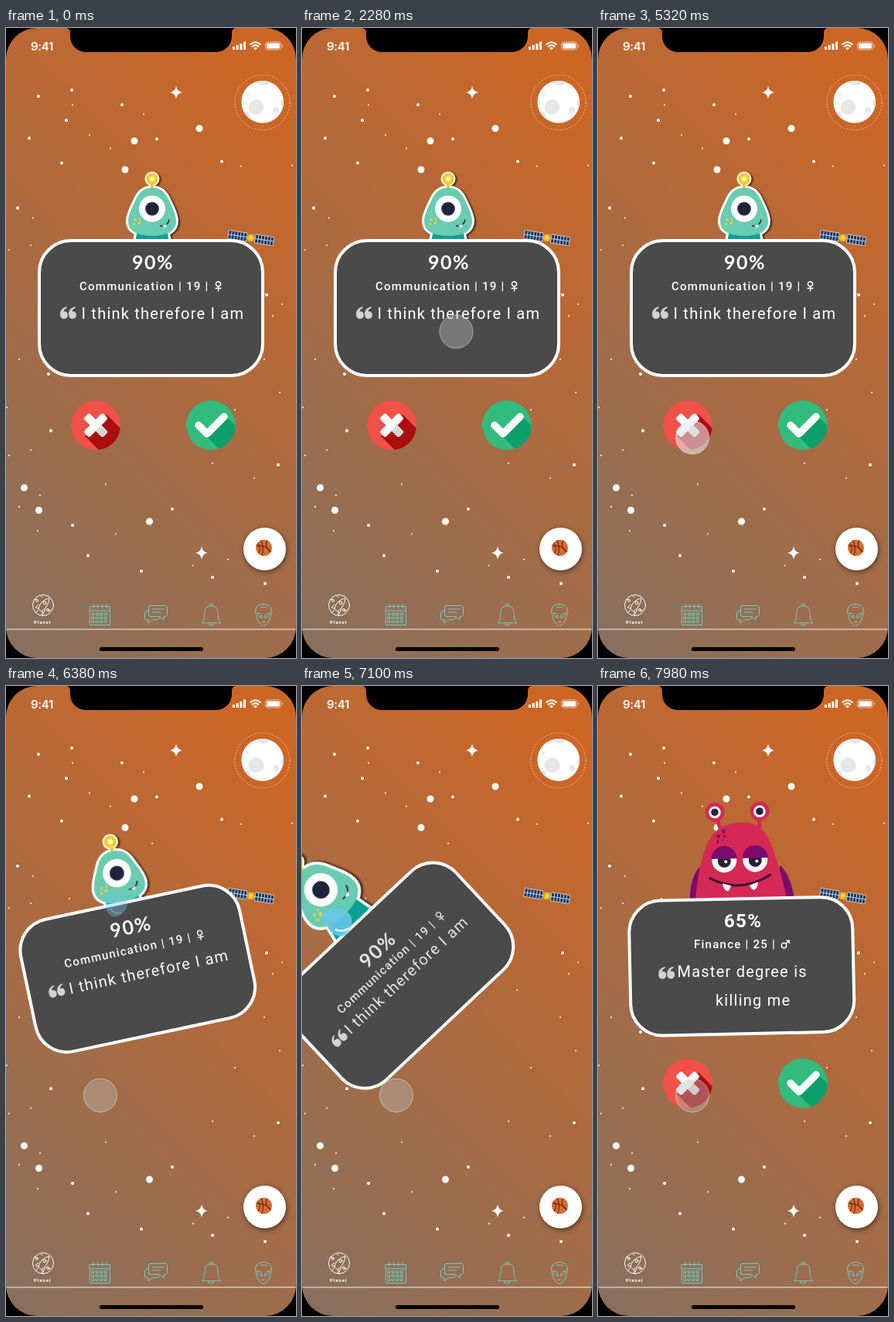
Write an HTML page that moves like this. It is 375x812 px and loops after 8 s.

```html
<!DOCTYPE html>
<html lang="en">
<head>
<meta charset="utf-8">
<title>Alien match</title>
<style>
html, body { margin: 0; width: 100%; height: 100%; overflow: hidden; background: #000; }
#screen { position: relative; width: 375px; height: 812px; overflow: hidden; border-radius: 40px;
  background: linear-gradient(225deg, #cd6625 8%, #86705f); }
svg { display: block; }
text { font-family: Roboto, sans-serif; fill: #fff; white-space: pre; }
.pct { font-weight: 700; font-size: 24px; letter-spacing: 1.3px; }
.info { font-weight: 500; font-size: 15px; letter-spacing: 1.25px; }
.say { font-size: 20px; letter-spacing: 1.23px; }
.line { fill: none; stroke: #fff; stroke-width: 1.4; }
.icons { fill: none; stroke: #74cfcb; stroke-width: .95; stroke-linejoin: round; stroke-linecap: round; }
.sticker { filter: drop-shadow(2px 1px 1px #000a); }
.outline { fill: #fff; stroke: #fff; stroke-width: 6; stroke-linejoin: round; }
</style>
</head>
<body>
<div id="screen">
<svg width="375" height="812" viewBox="0 0 375 812">
  <defs>
    <path id="spark" d="M0-8.500Q1-1 8 0Q1 1 0 8.500Q-1 1-8 0Q-1-1 0-8.500Z" fill="#fff"/>
    <g id="quote" fill="#d2d2d2">
      <path id="six" d="M0 9C0 4 3 0 8.500-.5L9 .7C6 1.800 4.500 3.500 4.500 5.500C8 4.600 9.900 7.200 9.900 9.800C9.900 13 7.700 15 5 15C2 15 0 12.700 0 9Z"/>
      <use href="#six" x="11"/>
    </g>
    <path id="head" d="M0-27C12-27 18-20 22-10C26-1 31 7 31 16C31 29 18 35 0 35C-18 35-31 29-31 16C-31 7-26-1-22-10C-18-20-12-27 0-27Z"/>
    <path id="neck" d="M-19 28H19L24 51H-24Z"/>
    <g id="panel">
      <rect x="-12" y="-5.500" width="24" height="11" fill="#173661" stroke="#e8eef5" stroke-width=".7"/>
      <path d="M-8-5V5M-4-5V5M0-5V5M4-5V5M8-5V5M-12 0H12" stroke="#cfdcea" stroke-width=".9"/>
    </g>
    <rect id="bar" x="-17.500" y="-5.200" width="35" height="10.400" rx="3" fill="#fff"/>
    <clipPath id="disc"><circle r="32"/></clipPath>
    <clipPath id="moonDisc"><circle cx="331.700" cy="95.300" r="27.300"/></clipPath>
  </defs>

  <g id="stars" stroke="#fff" stroke-linecap="round"></g>
  <use href="#spark" x="220" y="83"/>
  <use href="#spark" x="253" y="676.500"/>

  <g>
    <circle cx="331.500" cy="96" r="35.500" fill="none" stroke="#fff" stroke-opacity=".55" stroke-dasharray="2 2"/>
    <circle cx="331.700" cy="95.300" r="27.300" fill="#fff"/>
    <g fill="#e7e7e7" clip-path="url(#moonDisc)">
      <circle cx="323.500" cy="102" r="10"/><circle cx="349" cy="106" r="4"/><circle cx="311" cy="113" r="5"/>
      <circle cx="359" cy="97" r="4"/><ellipse cx="332" cy="70" rx="8" ry="4"/><circle cx="312" cy="86" r="2"/>
    </g>
  </g>

  <g id="satellite" transform="translate(316.700 270.500) rotate(9)">
    <path d="M-17 0H17" stroke="#ddd"/>
    <use href="#panel" x="-17.500"/><use href="#panel" x="17.500"/>
    <rect x="-4" y="-4.500" width="8" height="9" rx="2" fill="#f5b51c"/>
    <circle r="2" fill="#ffe27a"/>
  </g>

  <g id="buttons">
    <g transform="translate(116 512)" clip-path="url(#disc)">
      <circle r="32" fill="#f05149"/>
      <path d="M14-14L50 22V50H22L-14 14Z" fill="#aa0f10"/>
      <use href="#bar" transform="rotate(45)"/>
      <rect y="-5.200" width="17.500" height="10.400" rx="3" fill="#d6d6d6" transform="rotate(45)"/>
      <use href="#bar" transform="rotate(-45)"/>
    </g>
    <g transform="translate(265 512)" clip-path="url(#disc)">
      <circle r="32" fill="#32bb7c"/>
      <path d="M20-11L60 29V60H40L-6 14Z" fill="#0c9f6c"/>
      <path d="M-16 0L-5 11L17-11" fill="none" stroke="#fff" stroke-width="9.500" stroke-linecap="round" stroke-linejoin="round"/>
    </g>
  </g>

  <g id="alienA" class="sticker">
    <g class="outline">
      <use href="#neck"/><use href="#head"/>
      <circle cy="-38.500" r="6.500"/><path d="M0-38V-24"/>
    </g>
    <use href="#neck" fill="#08a092"/>
    <path d="M0-36V-22" stroke="#fcc51d" stroke-width="4"/>
    <circle cy="-38.500" r="7.500" fill="#fccb1f"/>
    <circle cy="-38.500" r="3.300" fill="#fff6d5"/>
    <use href="#head" fill="#69cbb0"/>
    <circle r="17" fill="#fff"/>
    <circle r="8.800" fill="#20243a"/>
    <g fill="#fbd02c"><circle cx="-22" cy="14" r="1.600"/><circle cx="-17" cy="18" r="2"/><circle cx="-23" cy="20" r="1.400"/><circle cx="-16" cy="13" r="1.200"/></g>
    <path d="M10 22Q20 23 22 14" fill="none" stroke="#263246" stroke-width="1.600"/>
    <path d="M13 22L19 19.500L17 24Z" fill="#fff"/>
  </g>

  <g id="alienB">
    <path d="M-52 8C-62 18-66 36-66 60H-40ZM52 8C62 18 69 36 70 60H40Z" fill="#7c0b6e"/>
    <path d="M-31-62L-22-34M27-62L26-36" stroke="#d42654" stroke-width="5"/>
    <path d="M-59 58C-56 20-48-12-38-28C-28-44-12-48 3-48C24-48 33-38 40-22C50 5 56 30 61 58Z" fill="#d62855"/>
    <g id="stalkEyes"></g>
    <g fill="#86105f"><circle cx="-20" cy="-37" r="2.500"/><circle cx="-27" cy="-31" r="2.300"/><circle cx="-19" cy="-31" r="1.700"/><circle cx="-28" cy="-24" r="2"/><circle cx="-22" cy="-26" r="1.200"/></g>
    <g id="faceEyes"></g>
    <path d="M-39 23Q0 44 39 20" fill="none" stroke="#3a1233" stroke-width="3" stroke-linecap="round"/>
    <path d="M-23 30L-12 33Q-14 40-17 40Q-22 38-23 30ZM12 33L23 29Q22 38 18 39Q14 39 12 33Z" fill="#fff"/>
  </g>

  <g id="card">
    <rect x="-144.500" y="-87" width="289" height="174" rx="41" fill="#4a4a4a" stroke="#fff" stroke-width="4"/>
    <use id="mark" href="#quote"/>
    <g id="textA" transform="translate(-187.500 -361)">
      <text data-drift="0 16" class="pct" x="163" y="311" style="font-family:Lato,sans-serif;font-size:25px;letter-spacing:1.5px">90%</text>
      <g data-drift="4 9">
        <text class="info" x="95" y="338">Communication | 19 |</text>
        <path class="line" d="M274.500 333V339.500M270.500 335.500H278.500"/><circle class="line" cx="274.500" cy="330" r="3"/>
      </g>
      <text data-drift="-8 -1" class="say" x="97.500" y="375">I think therefore I am</text>
    </g>
  </g>
  <g id="textB">
    <text class="pct" x="163" y="311">65%</text>
    <text class="info" x="124" y="338">Finance | 25 |</text>
    <circle class="line" cx="240.500" cy="334.500" r="3.200"/><path class="line" d="M243 332L247 328.500M243.500 328.300H247.300V332"/>
    <text class="say" x="102.500" y="375">Master degree is</text>
    <text class="say" x="152" y="412">killing me</text>
  </g>
  <g id="bib">
    <path d="M-17 18Q-5 20 1 27Q6 34 4 41Q-2 51-14 51Q-22 46-22 36Z" fill="#6cc8ee"/>
    <path d="M-17 39Q-14 47-5 48" fill="none" stroke="#fff" stroke-width="2"/>
  </g>

  <g id="ball">
    <circle cx="334.500" cy="671.500" r="27.500" fill="#fff" style="filter:drop-shadow(1px 2px 3px #0008)"/>
    <circle cx="333.500" cy="670" r="10.500" fill="#d96a2e"/>
    <path d="M323.500 667Q335 666 343 675M330 660Q334 670 331 680M338 660.500Q333 668 342 676M325 664Q331 671 326 677" fill="none" stroke="#47210f"/>
  </g>

  <path d="M0 775H375" stroke="#fff" stroke-opacity=".9"/>
  <g class="icons">
    <g stroke="#fff">
      <circle cx="48" cy="744" r="13.500"/>
      <path d="M42 748Q44 738 56 735Q55 746 46 752ZM42 743L38 747L42 748M47 752L47 757L51 749M42 750L38 754M36 737L39 736M45 732L47 734M55 752L58 750"/>
      <circle cx="50" cy="741" r="2"/><circle cx="40" cy="738" r="1.500"/><circle cx="54" cy="750" r="1.500"/>
    </g>
    <path d="M108.500 745.500H134.500V769.500H108.500ZM108.500 751H134.500M113 743V748M118.700 743V748M124.400 743V748M130 743V748"/>
    <path id="days"/>
    <path d="M187 744.500H206Q208.500 744.500 208.500 747V756Q208.500 758.500 206 758.500H204V763L198 758.500H187Q184.500 758.500 184.500 756V747Q184.500 744.500 187 744.500ZM189 749H204M189 753H200M184 751.500H182Q179.500 751.500 179.500 754V760Q179.500 762.500 182 762.500H184V767L190 762.500H196L199 760"/>
    <path d="M253.500 766.500Q257 763 257 757V753Q257 745 265.500 745Q274 745 274 753V757Q274 763 277.500 766.500ZM263 745Q263 742 265.500 742Q268 742 268 745M261.500 767Q262 770 265.500 770Q269 770 269.500 767"/>
    <path d="M333 742.500Q343.500 743 343.500 752Q342 764 336 769.500Q333 771.500 330 769.500Q324 764 322.500 752Q322.500 743 333 742.500ZM325 754Q331 754 331.500 760Q326 760 325 754ZM341 754Q335 754 334.500 760Q340 760 341 754ZM331 765.500H335M329 747Q333 745 337 747"/>
  </g>
  <text x="36" y="768" style="font-size:6px;font-weight:700;letter-spacing:.85px">Planet</text>

  <path d="M77 0Q83 0 83 6V10C83 22 92 31 104 31H271C283 31 292 22 292 10V6Q292 0 298 0Z"/>
  <rect x="121" y="798" width="134" height="5" rx="2.500"/>
  <text x="32" y="28.500" style="font:600 15px Inter,sans-serif;letter-spacing:-.3px">9:41</text>
  <g fill="#fff">
    <path d="M293 24h3v4h-3ZM297.700 22h3v6h-3ZM302.400 20h3v8h-3ZM307 17.500h3v10.500h-3Z"/>
    <path d="M315.500 21.500Q322.500 15 329.500 21.500M318 24.200Q322.500 20 327 24.200" fill="none" stroke="#fff" stroke-width="2"/>
    <path d="M320 26Q322.500 24 325 26L322.500 28.500Z"/>
    <rect x="335.500" y="18" width="20" height="10" rx="3" fill="none" stroke="#fff" stroke-opacity=".6"/>
    <rect x="337" y="19.500" width="17" height="7" rx="1.600"/><path d="M357 21Q359 23 357 25Z" opacity=".7"/>
  </g>

  <circle id="touch" r="21.500" stroke="#fff" stroke-opacity=".45"/>
</svg>
</div>
<script>
const $ = id => document.getElementById(id);

// Stars by diameter, as x, y pairs
const stars = {
  9: [166,145.5, 154,182.5, 250,129.5, 23.5,592.5, 42.5,621.5, 185.5,636],
  4: [42,88, 85,80, 78,119, 30,142, 150,99, 195,143, 72,174, 279,172, 15,232, 337,344, 55,446,
      58,519, 86,641, 215,620, 106,680, 175,700, 267,708, 335,716, 352,563],
  2: [86,99, 108,138, 178,111, 135,155, 304,178, 370,177, 35,245, 4,286, 32,280, 357,356, 345,371,
      17,427, 334,427, 354,470, 296,492, 1,489, 4,551, 32,544, 44,602, 17,617, 129,588, 41,648,
      142,652, 242,693, 287,685, 267,561, 321,580, 189,203, 82,274, 278,392]
};
for (const size in stars) {
  const d = stars[size].map((v, i) => i % 2 ? v + 'h0' : 'M' + v + ' ').join('');
  $('stars').innerHTML += `<path d="${d}" stroke-width="${size}"/>`;
}

let days = '';
for (let y = 754; y < 768; y += 5)
  for (let x = 111; x < 132; x += 5.5) days += `M${x} ${y}h3v2.500h-3Z`;
$('days').setAttribute('d', days);

const disc = (x, y, r, fill) => `<circle cx="${x}" cy="${y}" r="${r}" fill="${fill}"/>`;
$('stalkEyes').innerHTML = [-31, 27].map(x =>
  disc(x, -62, 12.5, '#d62855') + disc(x, -62, 7.8, '#fff') + disc(x, -62, 4.8, '#2a2036')).join('');
$('faceEyes').innerHTML = [-20, 20].map(x =>
  disc(x, 0, 16, '#fff') + disc(x, 1, 8.5, '#2a2036') + disc(x + 2, 2, 2, '#fff') +
  `<path d="M${x - 16.5}-2A16.500 16.500 0 0 1 ${x + 16.5}-2Z" fill="#7c0b6e"/>`).join('');

const clamp = v => Math.max(0, Math.min(1, v));
const easeOut = u => 1 - (1 - u) ** 2;
const smooth = u => u * u * (3 - 2 * u);

// Touch moves: start, end, target x, target y, easing
const moves = [
  [380, 980, 284.3, 126, easeOut],
  [1320, 1620, 211.5, 320.5, smooth],
  [2020, 2540, 187.5, 461.5, smooth],
  [2920, 3260, 172, 540, smooth],
  [4540, 5160, 122, 527.7, smooth]
];
function touchAt(t) {
  let x = 333, y = -23;
  for (const [start, end, toX, toY, ease] of moves) {
    const k = ease(clamp((t - start) / (end - start)));
    x += (toX - x) * k;
    y += (toY - y) * k;
  }
  return [x, y];
}

const LEAVE = 6240, SWING = 950, SWAP = LEAVE + SWING, TILT = -43.5;
const place = (id, x, y, angle, scale = 1) =>
  $(id).setAttribute('transform', `translate(${x} ${y}) rotate(${angle}) scale(${scale})`);
const show = (id, on) => $(id).style.display = on ? '' : 'none';

function draw() {
  const t = performance.now() % 8000;
  const second = t >= SWAP;
  const p = second ? 1 - easeOut(clamp((t - SWAP) / SWING)) : easeOut(clamp((t - LEAVE) / SWING));
  const angle = TILT * p;

  place('card', 187.5 - 62.8 * p, 361 + 12.2 * p, angle);
  place('mark', (second ? -107.5 : -117.5) - 5 * p, -1, 0);
  place('alienA', 189 - 166 * p, 233 + 30 * p, angle, 1 + .27 * p);
  place('bib', 189 - 166 * p, 233 + 30 * p, angle, 1 + .27 * p);
  place('alienB', 187 - 133 * p, 223 + 40 * p, angle);
  $('bib').style.opacity = .85 * clamp(p * 1.6);
  $('textA').style.opacity = 1 - .15 * p;
  for (const el of document.querySelectorAll('[data-drift]')) {
    const [dx, dy] = el.dataset.drift.split(' ');
    el.setAttribute('transform', `translate(${dx * p} ${dy * p})`);
  }

  for (const id of ['alienA', 'textA', 'bib']) show(id, !second);
  for (const id of ['alienB', 'textB']) show(id, second);
  show('buttons', t < LEAVE || second);

  const [x, y] = touchAt(t);
  const pressed = t >= 5320 && t < LEAVE;
  place('touch', x, y, 0);
  $('touch').style.fill = pressed ? '#e4e4e4' : '#b8b8b8';
  $('touch').style.fillOpacity = pressed ? .6 : .4;
  requestAnimationFrame(draw);
}
draw();
</script>
</body>
</html>
```
